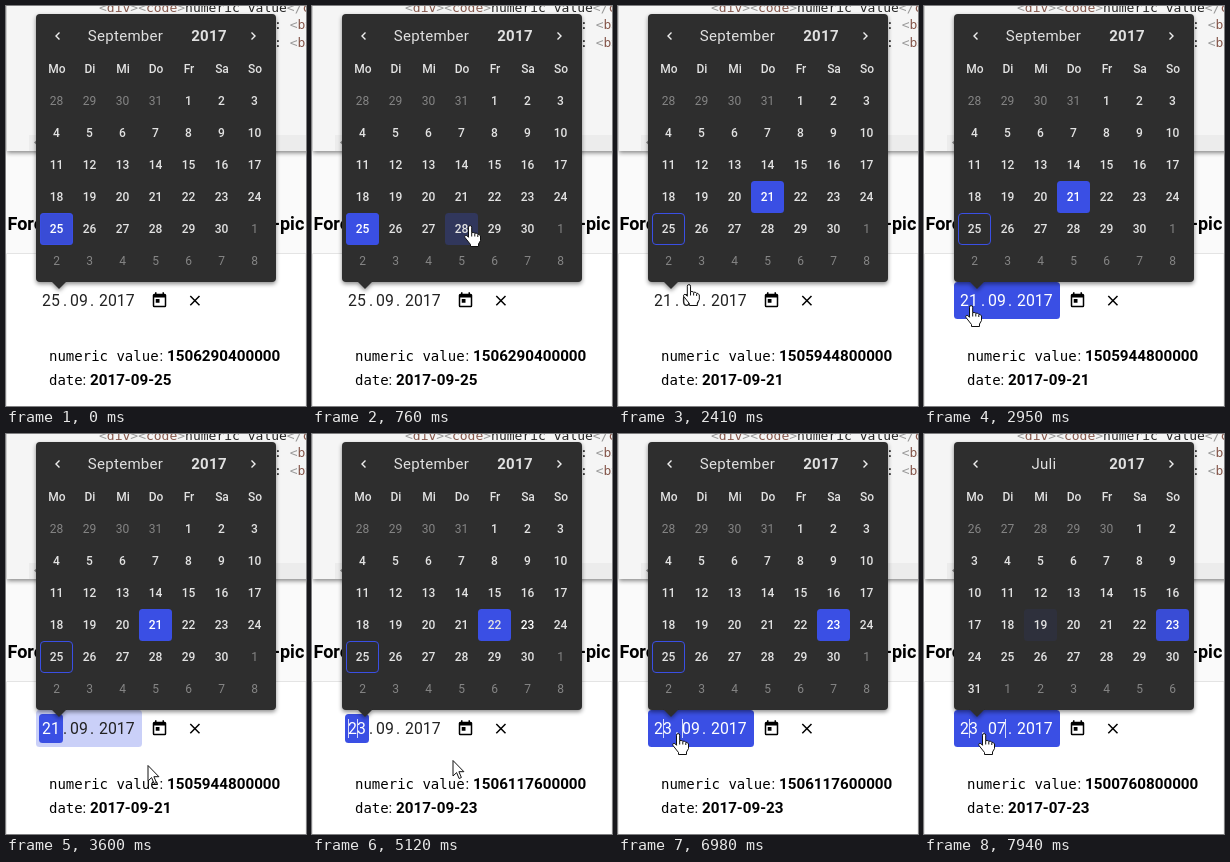
An HTML page that plays this animation: 300 by 400 pixels, repeating every 8000 ms.

```html
<!DOCTYPE html>
<html lang="de">
<head>
<meta charset="utf-8">
<title>Date picker</title>
<style>
html, body { margin: 0; height: 100%; overflow: hidden; background: #fafafa; }
svg { display: block; width: 300px; height: 400px; font-family: Roboto, Arial, sans-serif; white-space: pre; }
.mid { text-anchor: middle; }
.mono { font: 14px "DejaVu Sans Mono", monospace; }
.code { font: 13px "DejaVu Sans Mono", monospace; fill: #222; }
.p { fill: #999; }
.t { fill: #85564a; }
.bold { font-size: 15.2px; font-weight: 700; }
.head { font-size: 15px; letter-spacing: .3px; fill: #e0e0e0; }
.day { font-size: 12px; font-weight: 500; fill: #e2e2e2; }
.off { font-weight: 400; fill: #858585; }
.lit { fill: #fff; }
.field { font-size: 15.8px; }
</style>
</head>
<body>
<svg viewBox="0 0 300 400">
  <defs>
    <filter id="shade" x="-10%" y="-10%" width="120%" height="125%">
      <feDropShadow dx="0" dy="2" stdDeviation="2" flood-opacity=".45"/>
    </filter>
  </defs>
  <rect y="-10" x="1" width="320" height="155" fill="#f5f5f5" filter="url(#shade)"/>
  <rect x="23" y="129" width="277" height="16" fill="#ececec"/>
  <path d="M32 133v7l-4-3.500z" fill="#888"/>
  <g class="code">
    <text x="93" y="6"><tspan class="p">&lt;</tspan><tspan class="t">div</tspan><tspan class="p">&gt;&lt;</tspan><tspan class="t">code</tspan><tspan class="p">&gt;</tspan>numeric value<tspan class="p">&lt;/</tspan><tspan class="t">c</tspan></text>
    <text x="268" y="23">: <tspan class="p">&lt;</tspan><tspan class="t">b</tspan><tspan class="p">&gt;</tspan></text>
    <text x="268" y="41">: <tspan class="p">&lt;</tspan><tspan class="t">b</tspan><tspan class="p">&gt;</tspan></text>
  </g>
  <g font-size="18" font-weight="700"><text x="1.500" y="224">Fore</text><text x="267" y="224">-pic</text></g>
  <path d="M.5 400V247.500H300V400" fill="#fff" stroke="#e4e4e4"/>
  <g id="field"></g>
  <path transform="translate(144.500 285.500) scale(.75)" d="M7 10h5v5H7zM16 1v2H8V1H6v2H5a2 2 0 0 0-2 2v14a2 2 0 0 0 2 2h14a2 2 0 0 0 2-2V5a2 2 0 0 0-2-2h-1V1zM19 19H5V8h14z" fill-rule="evenodd"/>
  <path d="M184.300 290l9.200 9.200m0-9.200l-9.200 9.200" stroke="#000" stroke-width="1.500"/>
  <text x="43" y="355" class="mono">numeric value</text><text x="153.500" y="355" font-size="15">:</text>
  <text x="43" y="379" class="mono">date</text><text x="76.500" y="379" font-size="15">:</text>
  <text id="stamp" x="161" y="355" class="bold"></text>
  <text id="iso" x="84" y="379" class="bold"></text>
  <g filter="url(#shade)" fill="#2d2d2d">
    <rect x="30" y="8" width="240" height="268" rx="4"/>
    <path d="M45 275h16l-8 8z"/>
  </g>
  <path d="M53.500 26.500l-3.500 3.500 3.500 3.500M245.500 26.500l3.500 3.500-3.500 3.500" fill="none" stroke="#eee" stroke-width="1.400"/>
  <text id="month" x="120" y="35" class="head mid"></text>
  <text x="203" y="35" class="head mid" font-weight="700">2017</text>
  <g id="days"></g>
  <g id="cursor"></g>
</svg>
<script>
const LOOP = 8000, STEP = 110, BLUE = '#3a4fe4';
const $ = id => document.getElementById(id);

// [start, month, day, start of the highlight fade]
const picks = [[0, 9, 25, -STEP], [1530, 9, 21, 1530], [4800, 9, 22, 4800],
  [5120, 9, 23, 5120], [7630, 8, 23, 7630], [7940, 7, 23, 7830]];

// [start, end, x, y]: pointer moves
const moves = [[200, 540, 158, 219], [760, 980, 151, 193], [1850, 2630, 51, 299], [2730, 2950, 47, 299],
  [3380, 3600, 141.5, 331], [3720, 4040, 140.5, 326], [5670, 6340, 70, 290], [6760, 6980, 60, 299]];

// [enter, leave]: pointer over the date field
const hovers = [[230, 240], [2400, 3380], [5800, LOOP]];
const EDIT_DAY = 3380, TYPE_DAY = 4800, EDIT_MONTH = 6540;

const HAND = 'M-1.500 2.200a1.600 1.600 0 0 1 3.200 0V7.800l1.400-.4 1.700.9 1.500-.1 1.500 1.100 1.300.1 1.400 1.600v4.600l-2 3.400v2.500H.5v-2L-5 12.500c-1-1.600.8-2.900 2.200-1.600l1.300 1.400z';
const ARROW = 'M.5.5V16l3.600-3.400 2.500 5.900 2.300-1-2.500-5.800h5z';

const clamp = v => Math.max(0, Math.min(1, v));
const smooth = v => v * v * (3 - 2 * v);
const pad = n => String(n).padStart(2, '0');
const starts = [...picks, ...moves].map(e => e[0]);

// The screen refreshes every STEP after the latest event
function snap(time) {
  const start = Math.max(...starts.filter(s => s <= time));
  return start + Math.floor((time - start) / STEP) * STEP;
}

function pointer(t) {
  let x = 209, y = 331;
  for (const [a, b, toX, toY] of moves) {
    const steps = Math.round((b - a) / STEP);
    const k = smooth(clamp((t - a) / STEP / steps));
    x += (toX - x) * k;
    y += (toY - y) * k;
  }
  return [x, y];
}

const glow = t => Math.max(...hovers.map(([a, b]) =>
  clamp((t - a) / 300) * clamp(1 - (t - b) / 300)));

const offset = m => (new Date(Date.UTC(2017, m - 1, 1)).getUTCDay() + 6) % 7;
const cellOf = ([, m, d]) => offset(m) + d - 1;
const box = (x, y, w, h, attrs) => `<rect x="${x}" y="${y}" width="${w}" height="${h}" rx="3.5" ${attrs}/>`;
const label = (x, y, s, cls) => `<text x="${x}" y="${y}" class="${cls}">${s}</text>`;

function drawDays(t, now, before, mx, my) {
  const m = now[1], fade = clamp((t - now[3]) / STEP * .92 + (t > now[0] ? .08 : 0));
  let out = ['Mo', 'Di', 'Mi', 'Do', 'Fr', 'Sa', 'So']
    .map((s, i) => label(51 + 33 * i, 67, s, 'day mid')).join('');
  for (let i = 0; i < 42; i++) {
    const x = 34 + i % 7 * 33, y = 79 + Math.floor(i / 7) * 32;
    const date = new Date(Date.UTC(2017, m - 1, 1 + i - offset(m)));
    const month = date.getUTCMonth() + 1, day = date.getUTCDate();
    const hover = mx >= x && mx < x + 33 && my >= y && my < y + 32;
    const chosen = i === cellOf(now);
    let alpha = chosen ? fade : before && i === cellOf(before) ? 1 - fade : 0;
    if (hover) alpha = Math.max(alpha, .25);
    if (month === 9 && day === 25)
      out += box(x + .5, y + .5, 32, 31, `fill="none" stroke="${BLUE}"`);
    if (alpha) out += box(x, y, 33, 32, `fill="${BLUE}" opacity="${alpha}"`);
    if (hover && chosen) out += box(x + .5, y + .5, 32, 31, 'fill="none" stroke="#6475ee"');
    const tone = chosen ? ' lit' : month !== m ? ' off' : '';
    out += label(x + 16.5, y + 20.3, day, 'day mid' + tone);
  }
  $('days').innerHTML = out;
}

function drawField(t, [, m, d]) {
  const level = glow(t), full = level > .5, editing = t >= EDIT_DAY && t < EDIT_MONTH;
  const part = (x, s, on) =>
    `<text x="${x}" y="300" class="field" fill="${on ? '#fff' : '#222'}">${s}</text>`;
  const carets = t < TYPE_DAY ? [] : t < EDIT_MONTH ? [36, 45] : [45, m < 9 ? 81 : 64];
  $('field').innerHTML =
    box(30, 276, 106, 37, `fill="${BLUE}" opacity="${level}"`) +
    (editing ? box(33, 280, 24, 29, `fill="${BLUE}"`) : '') +
    part(36, pad(d), full || editing) + part(57, '.', full) + part(64, pad(m), full) +
    part(84, '.', full) + part(93, '2017', full) +
    carets.map(x => `<path d="M${x + .5} 285V304" stroke="#fff" opacity=".8"/>`).join('');
}

function drawPointer(x, y) {
  const hand = y < 271 || (y > 276 && y < 313 && x < 165);
  $('cursor').innerHTML = `<g transform="translate(${x} ${y})" stroke="#111">
    <path d="${hand ? HAND : ARROW}" fill="#fff"/>
    ${hand ? '<path d="M1.700 8v3.500M4.800 9v2.500M7.800 10v2"/>' : ''}</g>`;
}

function draw(t) {
  const i = picks.findLastIndex(p => p[0] <= t), now = picks[i], [, m, d] = now;
  const [x, y] = pointer(t);
  drawDays(t, now, picks[i - 1], x, y);
  drawField(t, now);
  drawPointer(x, y);
  $('cursor').style.display = t < moves[0][0] ? 'none' : '';
  $('month').textContent = { 7: 'Juli', 8: 'August', 9: 'September' }[m];
  $('month').setAttribute('x', m === 9 ? 119.5 : 120);
  $('stamp').textContent = Date.UTC(2017, m - 1, d, -2);
  $('iso').textContent = `2017-${pad(m)}-${pad(d)}`;
}

let shown = -1;
function frame() {
  const t = snap(performance.now() % LOOP);
  if (t !== shown) draw(shown = t);
  requestAnimationFrame(frame);
}
frame();
</script>
</body>
</html>
```
